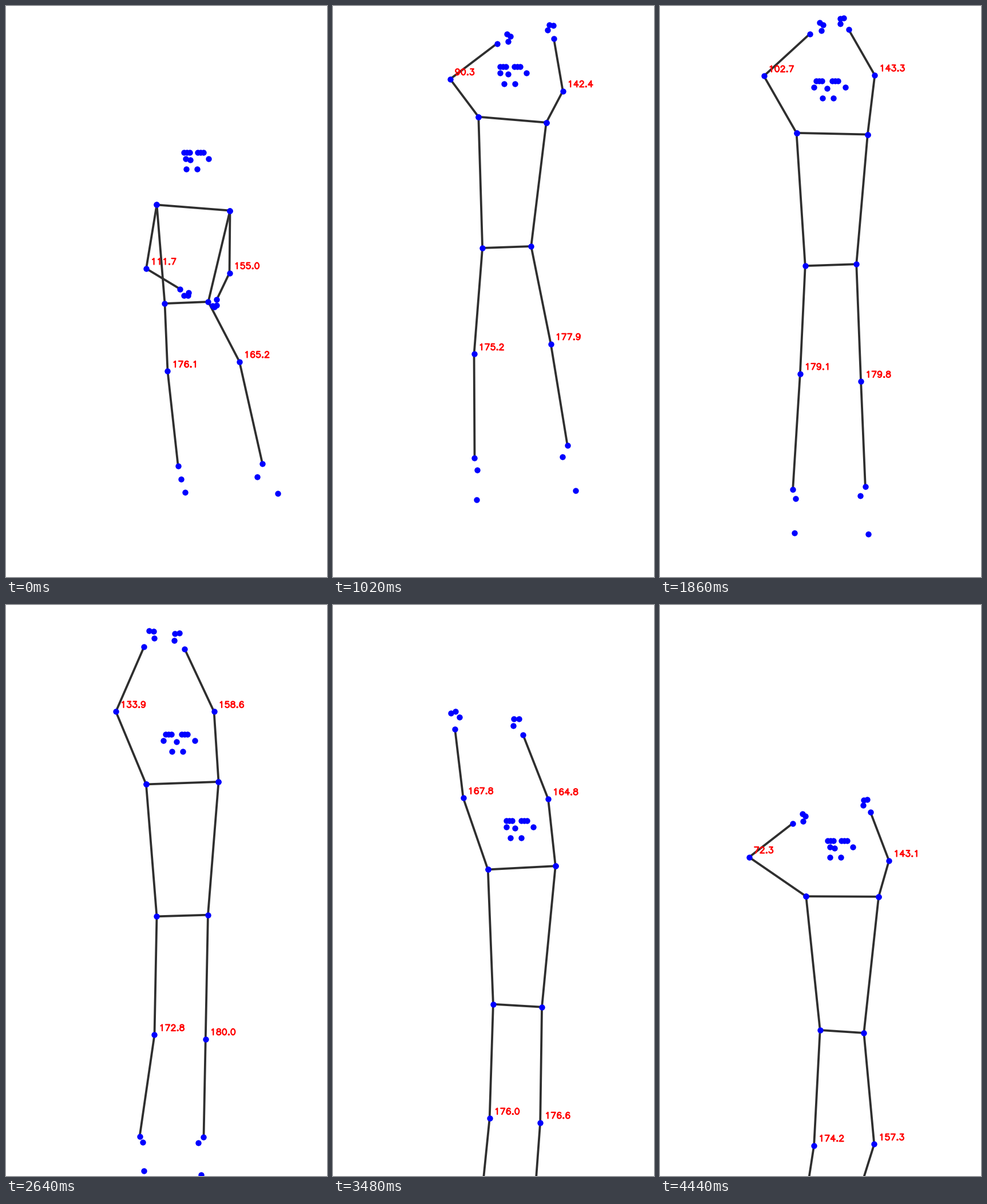
Write a matplotlib script that moves like this. It is 561 by 998 pixels and loops after 4.5 s.

```python
import numpy as np
import matplotlib.pyplot as plt
from matplotlib.animation import FuncAnimation
from matplotlib.collections import LineCollection

W, H, DPI = 561, 998, 64
STEP, FRAMES = 60, 75
PX = 72 / DPI  # points per pixel
MS = np.arange(FRAMES) * STEP
T = MS / 1000

LEAD_IN = (0, 540, 780)
POSES = (1020, 1860, 2640, 3120, 3900, 4320)
LEFT, RIGHT = -1, 1


def curve(*values):
    """Monotone cubic through the poses, with one to three lead-in keys."""
    ts = np.array(LEAD_IN[:len(values) - len(POSES)] + POSES, float)
    ys = np.array(values, float)
    h = np.diff(ts)
    d = np.diff(ys) / h
    prod = d[:-1] * d[1:]
    total = np.where(prod > 0, d[:-1] + d[1:], 1)
    m = np.r_[d[0], np.where(prod > 0, 2 * prod / total, 0), d[-1]]
    t = np.minimum(MS, ts[-1])
    i = np.clip(np.searchsorted(ts, t, "right") - 1, 0, len(h) - 1)
    u, w = (t - ts[i]) / h[i], h[i]
    return ((1 + 2 * u) * (1 - u) ** 2 * ys[i] + u * (1 - u) ** 2 * w * m[i]
            + u * u * (3 - 2 * u) * ys[i + 1] + u * u * (u - 1) * w * m[i + 1])


def wave(period, peak=0):
    return np.cos(2 * np.pi * (T - peak) / period)


def vec(x, y):
    """One point per frame; x and y may be constants."""
    return np.column_stack([x + 0 * T, y + 0 * T])


def ray(angle, length):
    """Angle in degrees: 0 hangs down, 90 points right."""
    a = np.radians(angle)
    return vec(length * np.sin(a), length * np.cos(a))


def limb(root, swing, upper, bend, lower):
    joint = root + ray(swing, upper)
    return joint, joint + ray(swing + bend, lower), np.abs(180 - bend % 360)


def fingers(wrist, angle, length, side):
    """Little finger, index finger and thumb, turned with the forearm."""
    k = length / 105
    return [wrist + ray(angle, along * k) + ray(angle + 90 * side, across * k)
            for along, across in ((25, -3), (27, 4), (18, 9))]


# Torso
neck = vec(curve(327.5, 322, 313.5, 300.7, 308.2, 330, 329, 318.7),
           curve(352.5, 285, 198.7, 223.2, 311.2, 409, 497.5, 509.5))
spine = vec(curve(-12, -9.8, -2.2, 0, -4.8, -8.8, -0.7),
            curve(166, 222.8, 229.5, 231.8, 240.2, 241.2, 236))
pelvis = neck + spine
half_chest = vec(61.5 + 2.5 * wave(2.35), 1.25 + 4.5 * wave(5.5, 0.5))
half_pelvis = vec(38 + 7 * np.sin(np.pi * T / 4.5),
                  0.5 + 2 * np.tanh(6 * (T - 2.9)))
shoulder_l, shoulder_r = neck - half_chest, neck + half_chest
hip_l, hip_r = pelvis - half_pelvis, pelvis + half_pelvis

# Arms: swing of the upper arm, its length, bend at the elbow, forearm length
arm_l = (curve(-9.4, -43, -100, -143.1, -150.2, -157.4, -161.7, -158.4, -124.5),
         curve(113, 68, 113, 82.5, 114.7, 137.6, 133.8, 130.2, 120.8),
         curve(68.3, 163, 227, 270.3, 282.7, 313.9, 349, 343.6, 252.3),
         curve(69, 60, 85, 102.7, 109, 123.4, 123, 115, 96.6))
arm_r = (curve(-0.5, 50, 110, 152.2, 173.1, 183.7, 188.2, 180.5, 164),
         curve(109, 30, 30, 62.2, 104.3, 122.8, 119.7, 114.5, 65.5),
         curve(-25, 120, 75, 37.6, 36.7, 21.4, 13.7, 19.7, 36.9),
         curve(52, 55, 80, 93.5, 92.3, 121.2, 121.4, 118.5, 91.2))

# Legs: the same four for thigh and shin
leg_l = (curve(2.4, -4.5, -2.7, -1.1, -2.1, -1.4, -3),
         curve(118.6, 186, 188.7, 207, 192.6, 209, 201.8),
         curve(3.9, 4.8, -0.9, -7.2, -4.6, -3.7, -5.8),
         curve(167, 181.5, 202.4, 179.3, 153, 180, 177))
leg_r = (curve(27.5, 11.4, 2.2, -1.1, -0.9, -0.7, 5.3),
         curve(118, 174, 205.2, 217, 197.5, 207.5, 195.3),
         curve(-14.8, -2.1, 0.2, 0, -3.2, -3.6, -22.7),
         curve(183, 179.3, 184, 171, 151.5, 177, 186))

elbow_l, wrist_l, elbow_angle_l = limb(shoulder_l, *arm_l)
elbow_r, wrist_r, elbow_angle_r = limb(shoulder_r, *arm_r)
knee_l, ankle_l, knee_angle_l = limb(hip_l, *leg_l)
knee_r, ankle_r, knee_angle_r = limb(hip_r, *leg_r)

hands = (fingers(wrist_l, arm_l[0] + arm_l[2], arm_l[3], LEFT)
         + fingers(wrist_r, arm_r[0] + arm_r[2], arm_r[3], RIGHT))

stretch = np.sin(np.pi * T / 3.1)
heel_drop = 23 * np.cos(0.42 * T)
feet = [ankle_l + vec(5, heel_drop), ankle_r + vec(-9, heel_drop),
        ankle_l + vec(12 - 10 * stretch, 46 + 32 * stretch),
        ankle_r + vec(27 - 12 * T, 52 + 32 * stretch)]

nose = neck + vec(-5 - 2 * T, curve(-84, -79.7, -79.2, -72.2, -66, -76, -85))
turn = 4 * wave(4.5)
face = [nose]
for side in (LEFT, RIGHT):
    face += [nose + vec(2.5 + 13 * side + 5 * k + (0.75 - 0.25 * side) * turn, -13)
             for k in (-1, 0, 1)]
    face.append(nose + vec(8 + 24 * side + (1 - side) * turn, -2))
    face.append(nose + vec(2 + 9.5 * side, 16.5))

outlines = [(wrist_l, elbow_l, shoulder_l, shoulder_r, elbow_r, wrist_r),
            (shoulder_l, hip_l, knee_l, ankle_l),
            (shoulder_r, hip_r, knee_r, ankle_r),
            (hip_l, hip_r)]
bone_paths = [np.stack(points, axis=1) for points in outlines]
joints = [p for points in outlines[:3] for p in points]
dots = np.stack(joints + hands + feet + face, axis=1)
readings = [(elbow_l, elbow_angle_l), (elbow_r, elbow_angle_r),
            (knee_l, knee_angle_l), (knee_r, knee_angle_r)]


def arc(cx, cy, rx, ry, start, end):
    a = np.radians(np.linspace(start, end, 24))
    return np.column_stack([cx + rx * np.cos(a), cy + ry * np.sin(a)])


def stroke(*parts):
    return np.vstack([np.atleast_2d(p) for p in parts])


# Single-stroke digits on a 20 x 21 grid
SIX = stroke(arc(11, 12, 7, 9, 45, 180), arc(10.5, 6.5, 6.5, 6.5, 180, 540))
GLYPHS = {
    "0": arc(10, 10.5, 7, 10.5, 90, 450),
    "1": stroke((6, 17), (8, 18), (11, 21), (11, 0)),
    "2": stroke(arc(10, 15.5, 6, 5.5, 175, -35), (3, 0), (17, 0)),
    "3": stroke((5, 21), (16, 21), (10, 13), arc(10, 6.5, 7, 6.5, 90, -160)),
    "4": stroke((13, 0), (13, 21), (3, 7), (18, 7)),
    "5": stroke((15, 21), (5, 21), (4, 12), arc(10, 7, 7, 7, 135, -155)),
    "6": SIX,
    "7": stroke((3, 21), (17, 21), (7, 0)),
    "8": stroke(arc(10, 16.7, 6, 4.3, 270, -90), arc(10, 6.2, 7, 6.2, 90, 450)),
    "9": (20, 21) - SIX,
    ".": arc(5, 1, 1, 1, 0, 360),
}


def label(text, x, y):
    lines = []
    for ch in text:
        lines.append(GLYPHS[ch] * (0.5, -0.5) + (x, y))
        x += 5 if ch == "." else 10
    return lines


fig = plt.figure(figsize=(W / DPI, H / DPI), dpi=DPI, facecolor="white")
ax = fig.add_axes([0, 0, 1, 1])
ax.set_xlim(0, W)
ax.set_ylim(H, 0)
ax.axis("off")

bones = LineCollection([], colors="#2f2f2f", linewidths=3.8 * PX,
                       capstyle="round", joinstyle="round", zorder=1)
marks, = ax.plot([], [], "o", color="#0000ff", ms=10.4 * PX, mew=0, zorder=2)
texts = LineCollection([], colors="#ff0000", linewidths=2.3 * PX,
                       capstyle="round", joinstyle="round", zorder=3)
ax.add_collection(bones, autolim=False)
ax.add_collection(texts, autolim=False)


def draw(i):
    bones.set_segments([path[i] for path in bone_paths])
    marks.set_data(dots[i, :, 0], dots[i, :, 1])
    lines = []
    for joint, angle in readings:
        x, y = joint[i]
        lines += label(f"{angle[i]:.1f}", x + 8, y - 7.3)
    texts.set_segments(lines)
    return bones, marks, texts


anim = FuncAnimation(fig, draw, frames=FRAMES, interval=STEP,
                     repeat=True, repeat_delay=0)
plt.show()
```
